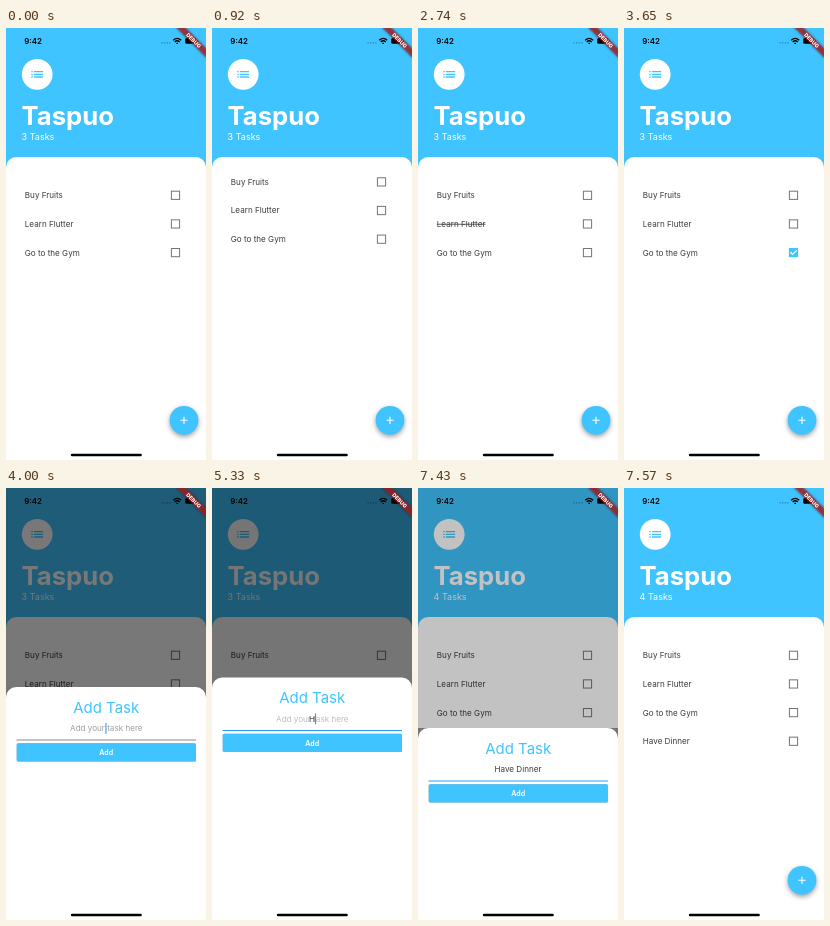
Recreate the animation shown at these times as an HTML page. Size 200 by 432 pixels, loop 8 s.

```html
<!DOCTYPE html>
<html lang="en">
<head>
<meta charset="utf-8">
<title>Task list</title>
<style>
  html, body { margin: 0; width: 200px; height: 432px; overflow: hidden; background: #fff; }
  svg { display: block; font-family: Inter, Roboto, sans-serif; }
  text { white-space: pre; }
  .mid { text-anchor: middle; }
  .body { font-size: 8.1px; fill: #3c3c3c; }
  .done { text-decoration: line-through; }
  .fab { filter: drop-shadow(0 2px 2.4px rgba(0, 0, 0, .38)); }
  .button { filter: drop-shadow(0 .7px .6px rgba(0, 0, 0, .35)); }
  .banner { filter: drop-shadow(0 0 1.6px rgba(0, 0, 0, .6)); }
</style>
</head>
<body>
<svg width="200" height="432" viewBox="0 0 200 432">
  <rect width="200" height="432" fill="#40c4ff"/>
  <circle cx="31.2" cy="46.3" r="15.4" fill="#fff"/>
  <path d="M25.3 43.6h1.4m1.2 0h9.2M25.3 46.3h1.4m1.2 0h9.2M25.3 49h1.4m1.2 0h9.2" stroke="#40c4ff" stroke-width="1.3"/>
  <text x="15.5" y="97" font-size="25.7" font-weight="700" fill="#fff">Taspuo</text>
  <text id="count" x="15.6" y="111.7" font-size="9" fill="#fff"></text>
  <path d="M0 432V139.4a10.4 10.4 0 0 1 10.4-10.4h179.2A10.4 10.4 0 0 1 200 139.4v293z" fill="#fff"/>
  <svg y="129" width="200" height="303"><g id="list"></g></svg>
  <circle class="fab" cx="178" cy="392.3" r="14.4" fill="#40c4ff"/>
  <path d="M174.4 392.3h7.2m-3.6-3.6v7.2" stroke="#fff" stroke-width="1.1"/>

  <text x="18.3" y="16" font-size="7.9" font-weight="600">9:42</text>
  <path d="M155.5 14.9h9" stroke="#23708f" stroke-width="1" stroke-dasharray="1.2 1.4"/>
  <g fill="none" stroke="#000" stroke-width="1.3">
    <path d="M167.2 12.2q4-3.6 8 0M168.7 13.9q2.5-2.2 5 0"/>
    <path d="M170.4 15.3h1.6"/>
  </g>
  <rect x="179.2" y="10" width="11" height="5.8" rx="1.5"/>
  <rect x="190.8" y="11.9" width=".8" height="2" rx=".4"/>

  <rect id="barrier" width="200" height="432"/>

  <g id="sheet">
    <rect width="200" height="260" fill="#757575"/>
    <path d="M0 260V10.3A10.3 10.3 0 0 1 10.3 0h179.4A10.3 10.3 0 0 1 200 10.3V260z" fill="#fff"/>
    <text class="mid" x="100.2" y="25.8" font-size="15" fill="#40c4ff">Add Task</text>
    <text id="hint" class="mid body" x="100.3" y="44.2" style="fill:#9e9e9e">Add your task here</text>
    <text id="input" class="mid body" x="100" y="44.2"></text>
    <rect id="caret" y="36" width="1.1" height="10.8" fill="#2a9df4"/>
    <path id="underline" d="M10.5 53h179.5" stroke-width="1.1"/>
    <rect class="button" x="10.7" y="56.3" width="179.3" height="18.3" rx="1.5" fill="#40c4ff"/>
    <text class="mid" x="100.2" y="68.3" font-size="7.1" font-weight="600" fill="#fff">Add</text>
  </g>

  <g transform="translate(200 0) rotate(45)">
    <rect class="banner" x="-22" y="14.4" width="44" height="6.2" fill="#b71c1c" fill-opacity=".72"/>
    <text class="mid" y="19.4" font-size="5.3" font-weight="800" fill="#fff">DEBUG</text>
  </g>
  <rect x="64.8" y="425.8" width="71" height="2.5" rx="1.25"/>
</svg>
<script>
const LOOP = 8000, STEP = 70, START = 500;
const $ = id => document.getElementById(id);
const clamp = v => Math.min(1, Math.max(0, v));
const set = (el, attrs) => { for (const k in attrs) el.setAttribute(k, attrs[k]); };

const tasks = [
  { name: 'Buy Fruits', on: 2180, off: 2460 },
  { name: 'Learn Flutter', on: 2740, off: 3020 },
  { name: 'Go to the Gym', on: 3300, off: 3650 },
  { name: 'Have Dinner', on: Infinity, off: Infinity }
];
const OPEN = 4000, CLOSE = 7290, SHEET_TOP = 189.5;
const typedAt = [5330, 5470, 5610, 5750, 5890, 6030, 6170, 6310, 6380, 6520, 6590];
const caretToggles = [4350, 4630, 5050, 5330, 6800];

$('list').innerHTML = tasks.map((task, i) => `<g transform="translate(0 ${38.3 + 28.65 * i})">
  <text class="body" x="18.8" y="2.9">${task.name}</text>
  <rect fill="none"/><path fill="none" stroke="#fff" stroke-width="1.1" pathLength="1"
    d="M166.3 -.5l2.3 2.3l4.1 -4.1"/></g>`).join('');
const rows = [...$('list').children];

// Drag up, pull down past the top, then spring back.
function scrollAt(t) {
  const ease = p => (1 - Math.cos(Math.PI * clamp(p))) / 2;
  if (t < 760) return -21 * ease((t - 430) / 330);
  if (t < 1340) return -21 + 43 * ease((t - 760) / 580);
  const d = (t - 1340) * .0095;
  return t > 2110 ? 0 : 22 * (1 + d) * Math.exp(-d);
}

function drawRow(row, task, t) {
  const [label, box, tick] = row.children;
  const p = t < task.off ? clamp((t - task.on) / 210) : 1 - clamp((t - task.off) / 210);
  const width = Math.min(4.6, 1 + 9.2 * p), size = 9.2 - width;
  const mix = clamp(p * 2);
  label.classList.toggle('done', t >= task.on && t < task.off);
  set(box, {
    x: 169.5 - size / 2, y: -size / 2, width: size, height: size, 'stroke-width': width,
    stroke: `rgb(${117 - 53 * mix},${117 + 79 * mix},${117 + 138 * mix})`
  });
  set(tick, { 'stroke-dasharray': `${clamp(p * 2 - 1)} 2`, opacity: p > .5 ? 1 : 0 });
}

// Sheet position and barrier opacity, one value per step.
function sheetAt(t) {
  if (t < OPEN || t >= CLOSE + 4 * STEP) return [432, 0];
  if (t < CLOSE) {
    const k = Math.min(2, (t - OPEN) / STEP);
    return [[199, 191.3, SHEET_TOP][k], k ? .54 : .53];
  }
  const k = (t - CLOSE) / STEP;
  return [[193, 206, 240, 325][k], [.5, .39, .24, .09][k]];
}

function caretAt(t) {
  const past = caretToggles.filter(at => at <= t);
  if (!past.length) return 1;
  const last = past[past.length - 1];
  if (last === typedAt[0]) return 1;
  const p = clamp((t - last + STEP) / (3 * STEP));
  return past.length % 2 ? 1 - p : p;
}

function draw(time) {
  const t = time < START ? 0 : START + STEP * Math.floor((time - START) / STEP);
  const added = t >= CLOSE;
  $('count').textContent = `${added ? 4 : 3} Tasks`;
  set($('list'), { transform: `translate(0 ${scrollAt(t)})` });
  rows.forEach((row, i) => drawRow(row, tasks[i], t));
  set(rows[3], { visibility: added ? 'visible' : 'hidden' });

  const [top, shade] = sheetAt(t);
  set($('barrier'), { opacity: shade });
  set($('sheet'), { transform: `translate(0 ${top})`, visibility: top < 432 ? 'visible' : 'hidden' });
  const typed = tasks[3].name.slice(0, typedAt.filter(at => at <= t).length);
  const text = typed.trimEnd();
  $('input').textContent = text;
  const end = text ? 100 + $('input').getComputedTextLength() / 2 : 99.4;
  set($('caret'), { x: end + (typed === text ? 0 : 2.3), opacity: caretAt(t) });
  set($('hint'), { opacity: 1 - clamp((t - typedAt[0] + STEP) / (3 * STEP)) });
  set($('underline'), { stroke: t < OPEN + STEP ? '#85898c' : '#2a9df4' });
}

const begin = performance.now();
function tick() {
  draw((performance.now() - begin) % LOOP);
  requestAnimationFrame(tick);
}
tick();
</script>
</body>
</html>
```
